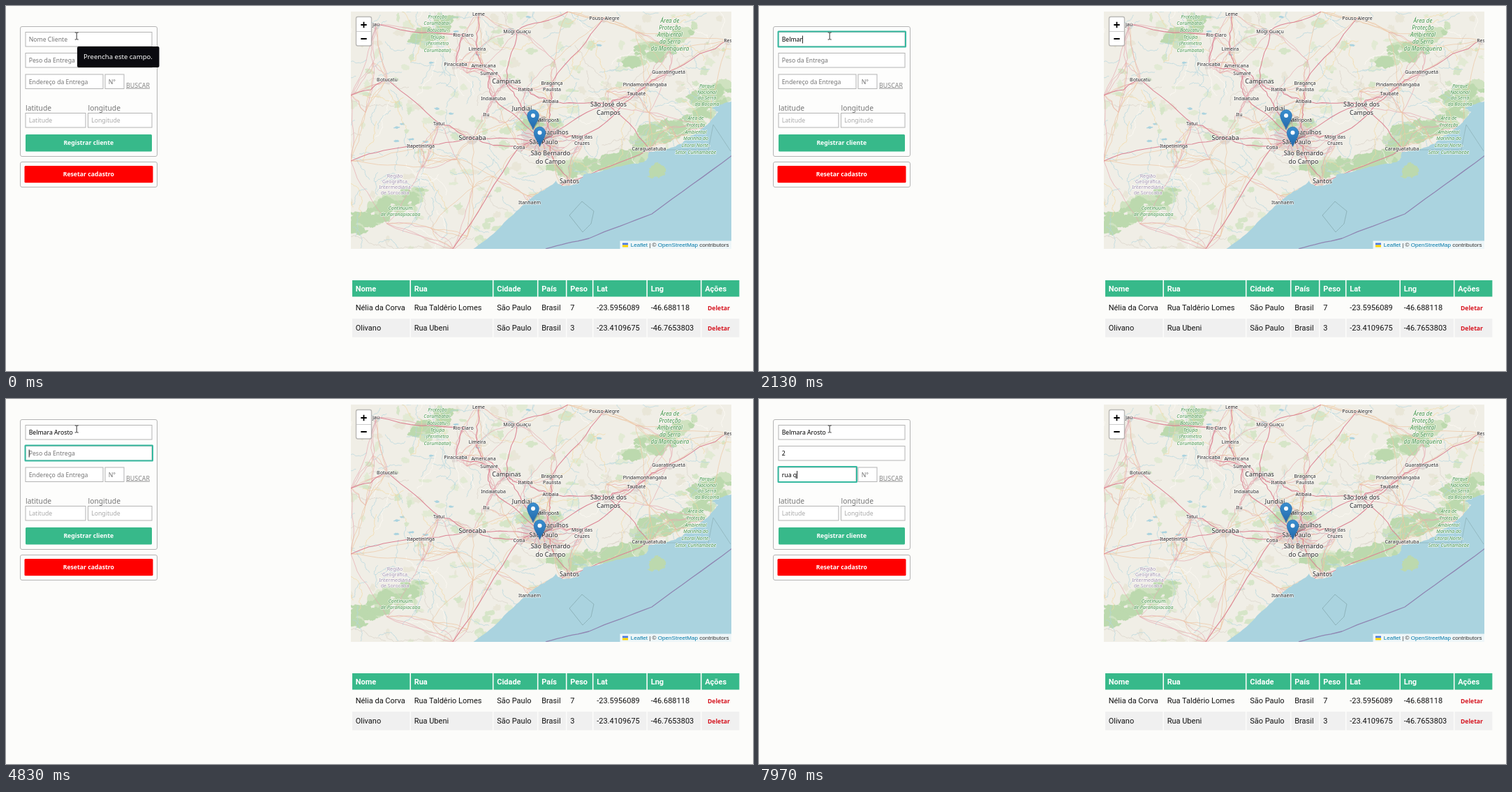
These frames come from a looping animation (1070x523 px, 8 s). An HTML page with a canvas:

```html
<!DOCTYPE html>
<html lang="pt-BR">
<head>
<meta charset="utf-8">
<title>Cadastro de entregas</title>
<style>
  html, body { margin: 0; width: 100%; height: 100%; overflow: hidden; background: #fcfcfa; }
  canvas, svg { position: absolute; left: 0; top: 0; width: 1070px; height: 523px; }
  text { font-family: "Noto Sans", "Open Sans", sans-serif; white-space: pre; }
  .mid { text-anchor: middle; }
  .hint { font-size: 8.7px; fill: #757575; }
  .pale { fill: #a9a9a9; }
  .typed { font-size: 8.7px; fill: #000; }
  .label { font-size: 10.3px; fill: #777; }
  .link { font-size: 8.9px; fill: #858585; text-decoration: underline; }
  .button { font-size: 8.7px; font-weight: 700; fill: #fff; }
  .delete { font-size: 8.6px; font-weight: 700; fill: #d6141f; }
  .tip { font-size: 9.55px; fill: #fff; }
  .head, .cell { font: 11px Roboto, sans-serif; fill: #111; }
  .head { font-weight: 700; fill: #fff; }
  .credit { font: 8.1px "Liberation Sans", sans-serif; fill: #333; text-anchor: end; }
  .place { text-anchor: middle; paint-order: stroke; stroke: rgba(255,255,255,.75); stroke-width: 1.6px; stroke-linejoin: round; fill: #222; }
  .park { fill: #3f9145; font-style: italic; }
  .region { fill: #a08fac; }
</style>
</head>
<body>
<canvas id="map" width="1070" height="523"></canvas>
<svg id="ui" viewBox="0 0 1070 523">
  <defs>
    <clipPath id="frame"><rect x="494" y="8" width="545" height="340"/></clipPath>
    <linearGradient id="blue" x2="0" y2="1"><stop stop-color="#3a8fd0"/><stop offset="1" stop-color="#2268a9"/></linearGradient>
  </defs>
  <g id="places" clip-path="url(#frame)"></g>
  <g id="over"></g>
  <g id="page"></g>
  <g id="live"></g>
</svg>
<script>
const $ = id => document.getElementById(id);
const c = $('map').getContext('2d');

// ---------- map shapes ----------
let seed = 41;
const rnd = () => {
  seed = (seed * 1664525 + 1013904223) % 4294967296;
  return seed / 4294967296;
};
const spread = r => (rnd() - .5) * 2 * r;
const anywhere = () => [494 + rnd() * 545, 8 + rnd() * 340];
const repeat = (n, f) => { for (let i = 0; i < n; i++) f(i); };
const pts = s => s.split(' ').map(p => p.split(',').map(Number));

// Midpoint displacement gives straight runs a natural wiggle.
function rough(list, amount, depth = 3) {
  for (; depth > 0; depth--, amount *= .55) {
    list = list.flatMap((p, i) => {
      const q = list[i + 1];
      return q ? [p, [(p[0] + q[0]) / 2 + spread(amount), (p[1] + q[1]) / 2 + spread(amount)]] : [p];
    });
  }
  return list;
}
function trace(list) {
  c.beginPath();
  list.forEach(p => c.lineTo(p[0], p[1]));
}
function fill(list, color) {
  trace(list);
  c.fillStyle = color;
  c.fill();
}
function stroke(list, color, width, amount) {
  trace(rough(list, amount));
  c.strokeStyle = color;
  c.lineWidth = width;
  c.stroke();
}
function blob(x, y, rx, ry, color) {
  const ring = [];
  repeat(10, i => {
    const a = i * Math.PI / 5, k = .7 + rnd() * .6;
    ring.push([x + Math.cos(a) * rx * k, y + Math.sin(a) * ry * k]);
  });
  fill(rough([...ring, ring[0]], Math.min(rx, ry) * .3, 2), color);
}
// Woods scattered along a ridge.
function ridge([x, y, x2, y2, width, count], color) {
  repeat(count, () => {
    const k = rnd();
    blob(x + (x2 - x) * k + spread(width), y + (y2 - y) * k + spread(width), 4 + rnd() * 9, 3 + rnd() * 5, color);
  });
}
function wander(color, width, steps, size) {
  let [x, y] = anywhere(), a = rnd() * 6.3;
  const list = [[x, y]];
  repeat(steps, () => {
    a += spread(.7);
    list.push([x += Math.cos(a) * size, y += Math.sin(a) * size]);
  });
  stroke(list, color, width, size * .22);
}

const cities = [
  ['Campinas', 717, 111], ['Sorocaba', 668, 192], ['São Paulo', 770, 198], ['Guarulhos', 784, 184],
  ['Jundiaí', 739, 150], ['São Bernardo|do Campo', 780, 214], ['São José dos|Campos', 863, 144], ['Santos', 807, 254]
];
const towns = [
  ['Jaú', 530, 29], ['Leme', 677, 14], ['Rio Claro', 655, 44], ['Limeira', 675, 64], ['Mogi Guaçu', 732, 39],
  ['Pouso Alegre', 857, 20], ['Piracicaba', 644, 86], ['Americana', 684, 88], ['Sumaré', 692, 99],
  ['Botucatu', 546, 108], ['Itatiba', 744, 122], ['Bragança|Paulista', 782, 113], ['Indaiatuba', 698, 135],
  ['Atibaia', 780, 139], ['Itu', 688, 158], ['Mairiporã', 776, 166], ['Tatuí', 620, 171], ['Cotia', 735, 205],
  ['Mogi das|Cruzes', 825, 190], ['Itapetininga', 594, 203], ['Itanhaém', 750, 284], ['Caraguatatuba', 921, 207],
  ['Taubaté', 903, 128], ['Pindamonhangaba', 915, 115], ['Guaratinguetá', 949, 97], ['Res', 1034, 52]
];
const settled = [...cities, ...towns];
const spot = Object.fromEntries(settled.map(([s, x, y]) => [s.split('|')[0], [x, y - 3]]));
Object.assign(spot, { west: [494, 128], southwest: [494, 222], south: [640, 348], north: [805, 8] });

const highways = [
  'São Paulo,Jundiaí,Campinas,Americana,Limeira,Leme',
  'São Paulo,Indaiatuba,Sumaré,Piracicaba,Rio Claro,Jaú',
  'São Paulo,Guarulhos,São José dos,Taubaté,Guaratinguetá,Res',
  'Guarulhos,Mairiporã,Atibaia,Bragança,Pouso Alegre',
  'São Paulo,Sorocaba,Tatuí,Botucatu,west',
  'São Paulo,Cotia,Sorocaba,Itapetininga,southwest',
  'Cotia,south', 'São Paulo,São Bernardo,Santos,Itanhaém',
  'Santos,Caraguatatuba,São José dos', 'Guarulhos,Mogi das,Taubaté',
  'Campinas,Mogi Guaçu,north', 'Campinas,Itatiba,Atibaia,São José dos'
];
const ridges = [
  [500, 312, 590, 268, 11, 34], [588, 60, 632, 20, 11, 16], [885, 88, 985, 32, 12, 26],
  [788, 236, 915, 216, 8, 34], [905, 196, 1030, 140, 11, 32], [990, 132, 1036, 116, 9, 12], [740, 172, 790, 168, 4, 7]
];
const coast = pts('668,349 707,318 735,291 765,266 788,250 798,258 820,254 828,241 865,233 906,226 916,222 '
  + '921,209 957,202 975,190 1001,172 1020,152 1012,146 1045,134 1045,352');

function drawMap() {
  c.save();
  c.beginPath();
  c.rect(494, 8, 545, 340);
  c.clip();
  c.lineJoin = 'round';
  fill([[494, 8], [1039, 8], [1039, 348], [494, 348]], '#f0eee6');

  const green = '#bcd9ae', sea = '#aad3df', urban = '#dfd8d4';
  repeat(240, i => blob(...anywhere(), 2 + rnd() * 8, 2 + rnd() * 5, ['#e9e6d8', '#e2ead4', '#d6e5c8'][i % 3]));
  ridges.forEach(r => ridge(r, '#cfe2c0'));
  ridges.forEach(r => ridge(r, green));
  blob(766, 192, 32, 20, urban);
  settled.forEach(([, x, y], i) => blob(x, y, i < 8 ? 9 : 5, i < 8 ? 6 : 4, urban));

  repeat(150, () => wander('#b2d6df', .7, 5, 7));
  repeat(14, () => blob(505 + rnd() * 400, 15 + rnd() * 210, 4, 1.6, sea));
  repeat(110, i => wander(['#f2d9a4', '#fffdf6', '#d8d2c8'][i % 3], .7, 7, 9));

  // Every place is tied to its nearest neighbours.
  const hubs = Object.values(spot);
  repeat(34, () => hubs.push(anywhere()));
  hubs.forEach((p, n) => hubs
    .map(q => [Math.hypot(p[0] - q[0], p[1] - q[1]), q])
    .sort((a, b) => a[0] - b[0]).slice(1, 5)
    .forEach(([, q]) => stroke([p, q], n % 2 ? '#edc6a4' : '#e5a9b0', .7, 5)));
  repeat(15, i => {
    const a = i * .42;
    stroke([[767, 192], [767 + Math.cos(a) * 36, 192 + Math.sin(a) * 27]], '#df8c9b', .7, 4);
  });
  highways.forEach(s => stroke(s.split(',').map(n => spot[n]), '#dc8494', 1.05, 5));

  fill(rough(coast, 2), sea);
  blob(931, 236, 13, 11, green);
  stroke(pts('773,348 835,333 925,298 1040,214'), '#8f86b2', 1.3, 1);
  stroke(pts('825,280 842,294 838,312 826,324 807,300 825,280'), '#86aab0', .8, 0);
  stroke(pts('946,206 1006,206 1013,170 1038,208'), '#8fb3ba', .8, 0);
  c.restore();
}
drawMap();

// ---------- interface ----------
function add(parent, tag, attrs, text) {
  const el = document.createElementNS('http://www.w3.org/2000/svg', tag);
  for (const k in attrs) el.setAttribute(k, attrs[k]);
  if (text) el.textContent = text;
  return parent.appendChild(el);
}
const put = (g, cls, x, y, s) => add(g, 'text', { class: cls, x, y }, s);
const box = (g, x, y, width, height, fill, more) => add(g, 'rect', { x, y, width, height, fill, ...more });
const places = $('places'), over = $('over'), page = $('page'), live = $('live');

function place(text, x, y, size, gap, cls = '') {
  text.split('|').forEach((s, i) => put(places, 'place ' + cls, x, y + i * gap, s).style.fontSize = size + 'px');
}
place('Região|Geográfica|Intermediária|de Sorocaba', 557, 246, 7, 8, 'region');
place('Proteção|Corumbataí-|Botucatu-|Tejupa|(Perímetro|Corumbataí)', 618, 17.5, 7, 9.7, 'park');
place('Área de|Proteção|Ambiental|da Serra|da Mantiqueira', 951, 24, 8, 9.9, 'park');
place('Parque|Nacional|da Serra|da Bocaina', 1004, 117, 7, 8.7, 'park');
place('Área de|Proteção|Ambiental|Marinha do|Litoral Norte-|Setor Cunhambebe', 988, 163, 6.9, 9.8, 'park');
place('Continuum|de Paranapiacaba', 565, 292, 7, 9, 'park');
towns.forEach(([s, x, y]) => place(s, x, y, 7, 9));
cities.forEach(([s, x, y]) => place(s, x, y, 8.9, 11.5));

function pin(x, y) {
  const g = add(over, 'g', { transform: `translate(${x} ${y})` });
  add(g, 'path', { d: 'M0 0L7-9L17-15Q21-18 16-19Q8-18 4-10z', fill: 'rgba(0,0,0,.2)' });
  add(g, 'path', { d: 'M0 0C-2-7-8.3-13-8.3-20a8.3 8.3 0 0 1 16.6 0C8.3-13 2-7 0 0z', fill: 'url(#blue)', stroke: '#2b6ea8', 'stroke-width': .7 });
  add(g, 'circle', { cx: 0, cy: -20, r: 3, fill: '#fff' });
}
pin(755, 177);
pin(764.5, 201.5);

box(over, 501.5, 15.5, 22, 41.5, '#fff', { rx: 2.5, stroke: 'rgba(0,0,0,.25)', 'stroke-width': 1.4 });
add(over, 'path', { d: 'M502 36.5H523', stroke: '#ccc' });
add(over, 'path', { d: 'M508.3 27H516.7M512.5 22.8V31.2M508.3 47H516.7', stroke: '#000', 'stroke-width': 1.8 });

box(over, 879.5, 336.5, 159.5, 11.5, 'rgba(255,255,255,.8)');
box(over, 883, 339.5, 8, 3, '#4c7be1');
box(over, 883, 342.5, 8, 3, '#ffd500');
const credit = put(over, 'credit', 1035.5, 345.3);
[['Leaflet', 1], [' | © '], ['OpenStreetMap', 1], [' contributors']]
  .forEach(([s, link]) => add(credit, 'tspan', link ? { fill: '#0078a8' } : {}, s));

// table
const teal = '#37b98a';
const edges = [496, 580, 698.5, 762.5, 803.5, 841.5, 919, 996.5, 1052];
const rows = [
  ['Nome', 'Rua', 'Cidade', 'País', 'Peso', 'Lat', 'Lng', 'Ações'],
  ['Nélia da Corva', 'Rua Taldêrio Lomes', 'São Paulo', 'Brasil', '7', '-23.5956089', '-46.688118', 'Deletar'],
  ['Olivano', 'Rua Ubeni', 'São Paulo', 'Brasil', '3', '-23.4109675', '-46.7653803', 'Deletar']
];
rows.forEach((row, r) => row.forEach((s, i) => {
  const x = edges[i], w = edges[i + 1] - x - 1.6;
  if (r !== 1) box(page, x, r ? 448 : 393, w, r ? 26.5 : 23.5, r ? '#f0f0f0' : teal);
  const del = r && i === 7;
  put(page, del ? 'delete' : r ? 'cell' : 'head', x + (del ? 8.5 : 4.7), [409, 436, 465.3][r] - (del ? .3 : 0), s);
}));

// form
const line = { stroke: '#b4b4b4', 'stroke-width': 1 };
box(page, 20.5, 29.5, 196, 186, '#fdfdfc', { ...line, rx: 2.5 });
box(page, 20.5, 223.5, 196, 36, '#fdfdfc', { ...line, rx: 2.5 });
box(page, 28, 184, 181, 24.5, teal, { rx: 1.5 });
box(page, 26.5, 229, 184, 24.3, '#f00', { rx: 1.5 });
put(page, 'button mid', 118.3, 199.4, 'Registrar cliente');
put(page, 'button mid', 118.3, 244.3, 'Resetar cadastro');
put(page, 'link', 172, 116.6, 'BUSCAR');
put(page, 'label', 28, 149.6, 'latitude');
put(page, 'label', 117.5, 149.6, 'longitude');

function field(x, y, w, hint, cls = '') {
  box(page, x, y, w, 20.5, '#fff', line);
  return { x, y, w, hint, text: put(page, 'hint ' + cls, x + 4.7, y + 13.7, hint) };
}
const fields = [
  field(28, 37.5, 181, 'Nome Cliente'),
  field(28, 67.5, 181, 'Peso da Entrega'),
  field(28, 98, 111, 'Endereço da Entrega')
];
field(142, 98, 27, 'N°');
field(28, 153.5, 86, 'Latitude', 'pale');
field(117.5, 153.5, 91.5, 'Longitude', 'pale');

const ring = box(live, 0, 0, 0, 22, 'none', { stroke: '#36b9a0', 'stroke-width': 2, rx: .5 });
const caret = box(live, 0, 0, .9, 11, '#111');
const tip = add(live, 'g', {});
box(tip, 102, 58, 117.5, 30, '#0a0a0f', { rx: 2 });
put(tip, 'tip', 111, 76.3, 'Preencha este campo.');
add(live, 'path', { d: 'M98.7 38H100.4L101.2 38.6L102 38H103.7M101.2 38.6V47.4M98.7 48H100.4L101.2 47.4L102 48H103.7', fill: 'none', stroke: '#333', 'stroke-width': 1 });

// ---------- motion ----------
const LOOP = 8000;
// Each burst: text, time of its first key, time between keys.
const script = [
  { focus: 300, bursts: [['B', 780, 0], ['elmara ', 1500, 135], ['Arosto', 3300, 150]] },
  { focus: 4500, bursts: [['2', 5250, 0]] },
  { focus: 6800, bursts: [['rua q', 7100, 180]] }
];
const keys = script.map(s => s.bursts.flatMap(([text, from, pace]) =>
  [...text].map((ch, i) => ({ ch, at: from + i * pace }))));

function draw(t) {
  let active = -1, last = 0;
  script.forEach((s, i) => {
    const done = keys[i].filter(k => k.at <= t);
    if (t >= s.focus) {
      active = i;
      last = Math.max(s.focus, ...done.map(k => k.at));
    }
    const f = fields[i];
    f.typed = done.map(k => k.ch).join('');
    f.text.textContent = f.typed || f.hint;
    f.text.setAttribute('class', f.typed ? 'typed' : 'hint');
  });
  const on = active >= 0;
  tip.style.display = on ? 'none' : '';
  ring.style.display = on ? '' : 'none';
  caret.style.display = on && (t - last) % 1000 < 500 ? '' : 'none';
  if (!on) return;
  const f = fields[active];
  ring.setAttribute('x', f.x - .5);
  ring.setAttribute('y', f.y - 1);
  ring.setAttribute('width', f.w + 1.5);
  caret.setAttribute('x', f.x + 4.7 + (f.typed ? f.text.getComputedTextLength() : 0));
  caret.setAttribute('y', f.y + 5);
}

const start = performance.now();
function tick() {
  draw((performance.now() - start) % LOOP);
  requestAnimationFrame(tick);
}
tick();
</script>
</body>
</html>
```
